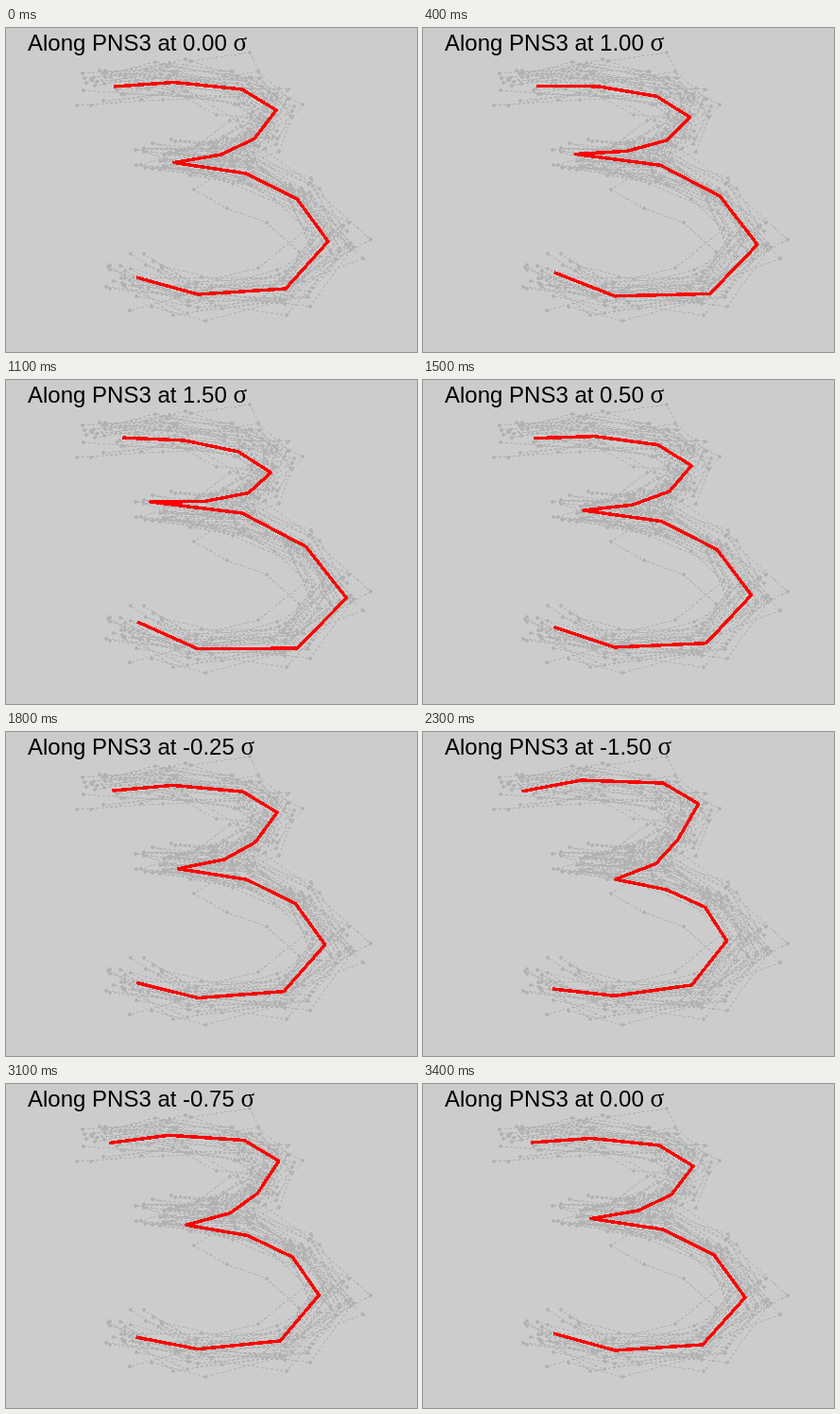
An HTML page that plays this animation: 435 px wide and 343 px high, repeating every 3500 ms.

```html
<!DOCTYPE html>
<html lang="en">
<head>
<meta charset="utf-8">
<title>Shape variation along PNS3</title>
<style>
  html, body { margin: 0; width: 100%; height: 100%; overflow: hidden; background: #ccc; }
  svg { display: block; width: 435px; height: 343px; }
  path { fill: none; shape-rendering: crispEdges; }
  #strokes { stroke: #b2b2b2; stroke-dasharray: 3 2; }
  #dots { fill: #b2b2b2; }
  #curve { stroke: #f00; stroke-width: 3.5; stroke-linejoin: round; }
  text { font: 24px "Liberation Sans", Arial, sans-serif; white-space: pre; }
  #sigma { font: 27px "Liberation Serif", "Times New Roman", serif; }
</style>
</head>
<body>
<svg viewBox="0 0 435 343">
  <path id="strokes"/>
  <path id="dots"/>
  <path id="curve"/>
  <text x="23" y="24"><tspan id="label"></tspan><tspan id="sigma">σ</tspan></text>
</svg>
<script>
const $ = id => document.getElementById(id);
const STEP = 100, STEPS = 35, DIGITS = 30;
const CENTER = [225, 170];

// Landmarks of the mean digit: x, y and their drift per sigma.
const landmarks = [
  [114, 62, 6.3, -0.6], [178, 57.5, 7, 4.3], [250, 65, -2.7, 7.3], [286, 87, -3.7, 7.3],
  [263, 117, -4.3, 1.7], [228, 134, -12.3, -3.6], [178, 142.5, -17, -9],
  [254, 154, -2.7, -8.7], [308, 181, 6.3, -3], [341, 226, 13, 3.3],
  [296, 276, 7.7, 5.4], [203, 282, 0, 1.8], [138, 264, 0.7, -5.3]
];
const pose = sigma => landmarks.map(([x, y, dx, dy]) => [x + dx * sigma, y + dy * sigma]);

const linePath = points => "M" + points.map(p => p.join(" ")).join("L");
const dotPath = ([x, y]) => `M${x - 2.5} ${y}l2.5-2.5 2.5 2.5-2.5 2.5z`;

let seed = 7;
function random() {
  seed = (seed * 1664525 + 1013904223) % 4294967296;
  return seed / 4294967296;
}
const bell = () => (random() + random() + random() - 1.5) * 2;

// A posed digit whose offsets wander along the stroke, with one landmark pushed outwards.
function handwrittenDigit() {
  const stray = Math.floor(random() * landmarks.length);
  const push = 0.35 * random();
  let u = bell(), v = bell();
  return pose(bell() * 0.8).map(([x, y], i) => {
    u = 0.6 * u + 0.8 * bell();
    v = 0.6 * v + 0.8 * bell();
    const spread = i % 6 ? 12 : 18; // stroke ends and cusp vary most
    const outward = i === stray ? push : 0;
    return [
      Math.round(x + u * spread + (x - CENTER[0]) * outward),
      Math.round(y + v * 11 + (y - CENTER[1]) * outward)
    ];
  });
}

const digits = Array.from({ length: DIGITS }, handwrittenDigit);
$("strokes").setAttribute("d", digits.map(linePath).join(""));
$("dots").setAttribute("d", digits.flat().map(dotPath).join(""));

// Up to +2, down to -2 and back, pausing one step at each end.
function sigmaAt(step) {
  if (step <= 9) return Math.min(step, 8) / 4;
  if (step <= 26) return Math.max(17 - step, -8) / 4;
  return (step - 34) / 4;
}

function draw() {
  const sigma = sigmaAt(Math.floor(performance.now() / STEP) % STEPS);
  $("curve").setAttribute("d", linePath(pose(sigma)));
  $("label").textContent = `Along PNS3 at ${sigma.toFixed(2)} `;
  requestAnimationFrame(draw);
}
draw();
</script>
</body>
</html>
```
